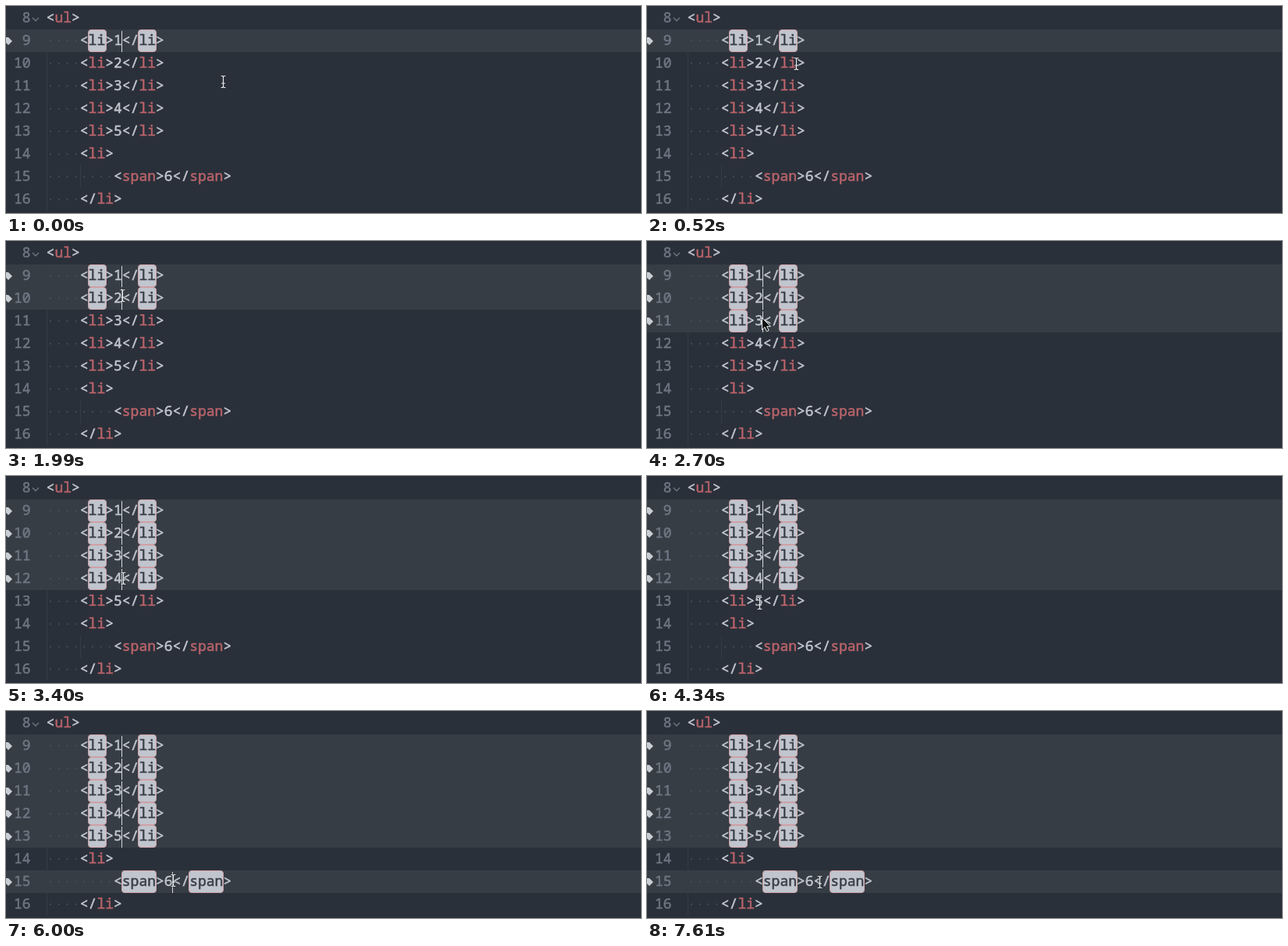
These frames come from a looping animation (814x265 px, 8000 ms). An HTML page:

```html
<!DOCTYPE html>
<html lang="en">
<head>
<meta charset="utf-8">
<title>Multiple cursors in an editor</title>
<style>
  html, body { margin: 0; width: 100%; height: 100%; overflow: hidden; background: #2a303a; }
  svg { display: block; }
  text {
    font: 500 18px "Noto Sans Mono", "DejaVu Sans Mono", monospace; white-space: pre;
    color: #c0c5ce; fill: currentColor; stroke: currentColor; stroke-width: .55px;
  }
  .num { color: #6f7682; text-anchor: end; }
  .tag { color: #b9636a; }
  .dot { fill: #4a525d; }
  .guide { fill: #353c46; }
  .on { visibility: hidden; }
  .active .on { visibility: visible; }
  .active .mark { color: #3a3f48; }
  .line { fill: #363d45; }
  .box { fill: #c0c5ce; stroke: #cfa0a6; }
  .icon { fill: #c9cdd4; }
  .caret { fill: #d5d9e0; }
</style>
</head>
<body>
<svg width="814" height="265" viewBox="0 0 814 265">
  <g id="rows"></g>
  <path d="M34 15l4 4l4-4" fill="none" stroke="#6f7682" stroke-width="1.3"/>
  <g id="beam" fill="none" stroke-linecap="round">
    <path id="bar" d="M-2.5-7.5Q0-7.5 0-6Q0-7.5 2.5-7.5M0-6V6M-2.5 7.5Q0 7.5 0 6Q0 7.5 2.5 7.5M-2 2H2" stroke="#1a1e26" stroke-width="2.6" stroke-opacity=".5"/>
    <path d="M-2.5-7.5Q0-7.5 0-6Q0-7.5 2.5-7.5M0-6V6M-2.5 7.5Q0 7.5 0 6Q0 7.5 2.5 7.5M-2 2H2" stroke="#eceef1" stroke-width="1.2"/>
  </g>
  <path id="arrow" d="M0 0V15L3.5 11.8L6 17.2L8.6 16L6.2 10.8H11Z" fill="#0b0c0e" stroke="#f4f4f4"/>
</svg>
<script>
const LOOP = 8000, CHAR = 10.8, LEFT = 51.6, LINE = 29, BLINK = 480;
const $ = id => document.getElementById(id);

// Times at which each list item, then the span, gets a caret
const clicks = [0, 1690, 2500, 3380, 5000];
const spanClick = 5900;
const lines = [
  { indent: 0, code: '<ul>' },
  ...clicks.map((start, i) => ({ indent: 4, code: `<li>${i + 1}</li>`, start })),
  { indent: 4, code: '<li>' },
  { indent: 8, code: '<span>6</span>', start: spanClick },
  { indent: 4, code: '</li>' }
];

// The blink restarts, visible, at each of these times
const restarts = [60 - BLINK, ...clicks.slice(1), spanClick, 6170];

// Pointer moves: start, end, x, y
const home = [278, 97];
const moves = [
  [60, 800, 150, 63],
  [920, 1100, 148, 60],
  [1100, 1520, 149, 70],
  [1990, 2520, 148, 99],
  [2820, 3380, 150, 131],
  [3700, 4100, 144, 163],
  [5060, 5420, 222, 235],
  [5640, 5900, 214, 217],
  [6350, 6410, 221, 219]
];

const rect = (cls, x, y, w, h, r = 0) =>
  `<rect class="${cls}" x="${x}" y="${y}" width="${w}" height="${h}" rx="${r}"/>`;

function drawRow({ indent, code, start }, index) {
  const top = 1 + index * LINE, selectable = start !== undefined;
  const text = (cls, x, s) =>
    `<text class="${cls}" x="${x}" y="${top + 20}">${s.replace(/</g, '&lt;')}</text>`;
  let x = LEFT + indent * CHAR, under = '', over = text('num', 31.5, String(8 + index));

  for (let i = 0; i < indent; i++) {
    const left = LEFT + i * CHAR;
    if (i % 4 === 0) over += rect('guide', Math.round(left), top, 1, LINE);
    over += `<circle class="dot" cx="${left + CHAR / 2}" cy="${top + 14.5}" r="1"/>`;
  }
  if (selectable) {
    under += rect('line on', 0, top, 814, LINE);
    over += `<path class="icon on" d="M0 ${top + 10}H3L8 ${top + 15}L3 ${top + 20}L0 ${top + 17}Z"/>`;
  }
  for (const part of code.match(/[a-z]+|\d|[<>\/]+/g)) {
    const w = part.length * CHAR, name = /[a-z]/.test(part);
    if (name && selectable)
      under += rect('box on', Math.round(x) - .5, top + .5, Math.round(w) + 1, 28, 3.5);
    over += text(name ? 'tag mark' : '', x, part);
    x += w;
    if (/\d/.test(part) && selectable)
      over += `<g class="blink">${rect('caret on', Math.round(x) - 1, top + 2, 1, 27)}</g>`;
  }
  return `<g class="row">${under + over}</g>`;
}

$('rows').innerHTML = lines.map(drawRow).join('');
const rows = [...document.querySelectorAll('.row')];
const carets = [...document.querySelectorAll('.blink')];

function pointerAt(t) {
  let [x, y] = home;
  for (const [start, end, toX, toY] of moves) {
    const k = Math.min(1, Math.max(0, (t - start) / (end - start)));
    const ease = k * k * (3 - 2 * k);
    x += (toX - x) * ease;
    y += (toY - y) * ease;
  }
  return [Math.round(x), Math.round(y)];
}

const show = (el, on) => el.style.display = on ? '' : 'none';

function render(t) {
  rows.forEach((row, i) => row.classList.toggle('active', t >= lines[i].start));
  const since = t - Math.max(...restarts.filter(r => r <= t));
  carets.forEach(c => show(c, Math.floor(since / BLINK) % 2 === 0));

  const [x, y] = pointerAt(t), arrow = t >= 2700 && t < 2820;
  $('beam').setAttribute('transform', `translate(${x + .5} ${y})`);
  $('arrow').setAttribute('transform', `translate(${x - .5} ${y - .5})`);
  show($('beam'), !arrow);
  show($('arrow'), arrow);
}

let origin;
function tick(now) {
  origin ??= now;
  render((now - origin) % LOOP);
  requestAnimationFrame(tick);
}
render(0);
requestAnimationFrame(tick);
</script>
</body>
</html>
```
